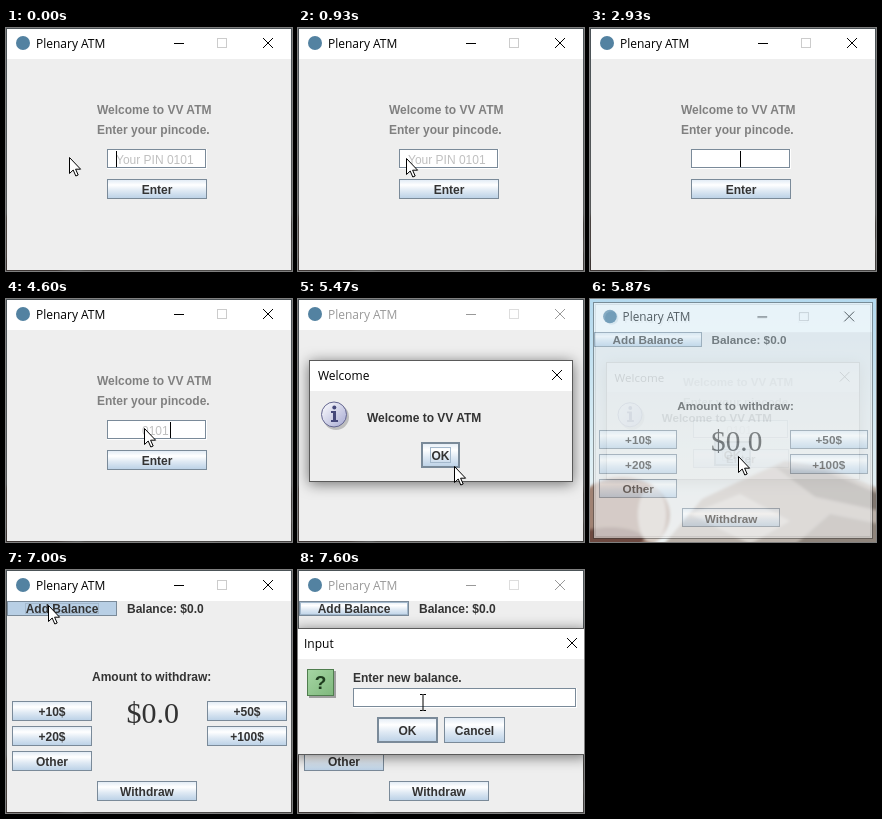
An HTML page that plays this animation: 286 by 243 pixels, repeating every 8 s.

```html
<!DOCTYPE html>
<html lang="en">
<head>
<meta charset="utf-8">
<title>Plenary ATM</title>
<style>
html, body { margin: 0; height: 100%; overflow: hidden; background: #eee; }
svg { display: block; width: 100%; height: 100%; }
text { font: bold 12px "Liberation Sans", Arial, sans-serif; fill: #333; white-space: pre; }
rect { shape-rendering: crispEdges; }
.title { font: 12px "Open Sans", "Noto Sans", sans-serif; fill: #000; }
.grey { fill: #808080; }
.entry { font-weight: normal; fill: #c0c0c0; }
.money { font: 30px "Liberation Serif", "Times New Roman", serif; }
.mid { text-anchor: middle; }
.sign { fill: none; stroke: #000; }
.off { stroke: #ccc; }
.idle .title { fill: #999; }
.idle .sign { stroke: #999; }
.idle .off { stroke: #ddd; }
.shade { filter: drop-shadow(0 2px 7px #0008); }
</style>
</head>
<body>
<svg id="stage" viewBox="0 0 286 243" preserveAspectRatio="none">
  <defs>
    <linearGradient id="face" x2="0" y2="1">
      <stop stop-color="#dde8f3"/><stop offset=".3" stop-color="#fff"/>
      <stop offset=".6" stop-color="#dde8f3"/><stop offset="1" stop-color="#b8cfe5"/>
    </linearGradient>
    <linearGradient id="sky" x2="0" y2="1">
      <stop stop-color="#b4d9ee"/><stop offset=".6" stop-color="#dbeef5"/><stop offset="1" stop-color="#eef3f3"/>
    </linearGradient>
    <linearGradient id="lilac" x2="1" y2="1">
      <stop stop-color="#fff"/><stop offset="1" stop-color="#a5a8d2"/>
    </linearGradient>
    <linearGradient id="green" x2="1" y2="1">
      <stop stop-color="#a6d6a4"/><stop offset="1" stop-color="#7fb87d"/>
    </linearGradient>
    <filter id="soft"><feGaussianBlur stdDeviation="1.5"/></filter>
  </defs>
  <g id="desktop">
    <rect width="286" height="243" fill="url(#sky)"/>
    <g filter="url(#soft)">
      <path d="M70 250L112 200 150 182 195 162 235 168 290 190V250z" fill="#b9b0a8"/>
      <path d="M185 168L235 172 290 195V212L225 198z" fill="#80776f"/>
      <path d="M100 215L150 195 200 222 160 245z" fill="#dad5cf"/>
      <path d="M200 250L240 215 290 225V250z" fill="#8f857c"/>
      <ellipse cx="32" cy="216" rx="48" ry="38" fill="#a08273"/>
      <ellipse cx="62" cy="216" rx="14" ry="28" fill="#d8cdc5"/>
      <ellipse cx="20" cy="240" rx="34" ry="12" fill="#6d4a40"/>
    </g>
  </g>
</svg>
<script>
const stage = document.getElementById('stage');
const APP = 'Plenary ATM', HELLO = 'Welcome to VV ATM';

const rect = (x, y, w, h, attrs) => `<rect x="${x}" y="${y}" width="${w}" height="${h}" ${attrs}/>`;
const box = (x, y, w, h, attrs) => rect(x + .5, y + .5, w - 1, h - 1, attrs);
const text = (x, y, s, cls = '') => `<text x="${x}" y="${y}" class="${cls}">${s}</text>`;
const cross = (x, y) => `<path class="sign" d="M${x} ${y}l10 10m0-10l-10 10"/>`;

function button(x, y, w, h, label, id = '', strong = false) {
  const edge = strong ? rect(x + 1, y + 1, w - 2, h - 2, 'fill="none" stroke="#7a8a99" stroke-width="2"')
                      : box(x, y, w, h, 'fill="none" stroke="#7a8a99"');
  return rect(x, y, w, h, `fill="url(#face)" ${id && `id="${id}"`}`) + edge +
    text(x + w / 2, y + h / 2 + (h < 18 ? 4.5 : 5), label, 'mid');
}

const frame = (x, y, w, h, id = '') => box(x, y, w, h, `fill="none" stroke="#a3b8cc" id="${id}"`);

const field = (x, y, w, h) => rect(x, y, w, h, 'fill="#fff"') +
  box(x, y, w - 1, h - 1, 'fill="none" stroke="#7a8a99"');

const appWindow = (id, body) => `<g id="${id}">` +
  rect(0, 0, 286, 243, 'fill="#323232" fill-opacity=".8"') +
  rect(1, 1, 284, 30, 'fill="#fff"') + rect(1, 31, 284, 211, 'fill="#eee"') +
  '<circle cx="17" cy="15" r="7" fill="#5382a1"/>' + text(30, 20, APP, 'title') +
  '<path class="sign" d="M168 15.5h10"/>' +
  box(211, 10, 10, 10, 'class="sign off"') + cross(257, 10) + body + '</g>';

const dialog = (id, x, y, w, h, title, body) => `<g id="${id}">` +
  rect(x, y, w, h, 'fill="#5a5a5a" class="shade"') +
  rect(x + 1, y + 1, w - 2, 30, 'fill="#fff"') +
  rect(x + 1, y + 31, w - 2, h - 32, 'fill="#eee"') +
  text(x + 9, y + 20, title, 'title') + cross(x + w - 21, y + 10) + body + '</g>';

const infoIcon = '<circle cx="38" cy="118" r="13" fill="#0003"/>' +
  '<circle cx="36" cy="115.5" r="12.5" fill="url(#lilac)" stroke="#63658f"/>' +
  '<path d="M33 112h5v9h2v2h-7v-2h2v-7h-2z" fill="#45487a"/><circle cx="36.3" cy="108.5" r="2" fill="#45487a"/>';

const askIcon = rect(11, 101, 27, 27, 'fill="#0005"') +
  box(9, 99, 27, 27, 'fill="url(#green)" stroke="#4f7d4e"') +
  '<text x="22.5" y="119" class="mid" style="font-size:19px;fill:#1e3c1e">?</text>';

const login = appWindow('login',
  text(91, 86, HELLO, 'grey') + text(91, 106, 'Enter your pincode.', 'grey') +
  field(101, 121, 100, 20) + rect(110, 123, 79, 16, 'id="mark" fill="#b8cfe5"') +
  '<text id="pin" y="136" class="entry"></text>' +
  rect(110, 123, 1, 16, 'id="caret" fill="#000"') +
  button(101, 151, 100, 20, 'Enter', 'enter'));

const bank = appWindow('bank',
  button(1, 31, 110, 15, 'Add Balance', 'add') + frame(19, 33, 74, 11, 'focus') + frame(2, 32, 108, 13, 'hover') +
  text(121, 43, 'Balance: $0.0') + text(86, 111, 'Amount to withdraw:') +
  text(120.5, 153, '$0.0', 'money') +
  button(6, 131, 80, 20, '+10$') + button(6, 156, 80, 20, '+20$') + button(6, 181, 80, 20, 'Other') +
  button(201, 131, 80, 20, '+50$') + button(201, 156, 80, 20, '+100$') +
  button(91, 211, 100, 20, 'Withdraw'));

const welcome = dialog('welcome', 11, 61, 264, 122, 'Welcome',
  infoIcon + text(69, 123, HELLO) +
  button(123, 143, 39, 26, 'OK', 'ok', true) + frame(132, 148, 21, 16));

const input = dialog('input', -3, 58, 293, 127, 'Input',
  askIcon + text(55, 112, 'Enter new balance.') + field(55, 118, 224, 20) +
  button(79, 147, 61, 26, 'OK', '', true) + button(146, 147, 61, 26, 'Cancel'));

const pointer = '<path id="arrow" d="M.5.5v16l3.7-3.5 2.6 6 2.4-1-2.6-5.8h5z" fill="#fff" stroke="#000"/>' +
  '<path id="beam" d="M-3-7.5h2.5l.5.5.5-.5H3M0-7V8M-3 8.500h2.500l.5-.5.5.5H3" fill="none" stroke="#000"/>';

stage.insertAdjacentHTML('beforeend', login + welcome + bank + input + pointer);
const el = id => document.getElementById(id);

// Pointer way points: tick, x, y
const way = [
  [1, 63, 129], [5, 128, 133], [7, 128, 133], [10, 106, 130], [13, 106, 130], [16, 112, 130],
  [19, 112, 130], [21, 75, 114], [22, 61, 112], [24, 140, 160], [26, 220, 172], [28, 251, 196],
  [30, 205, 172], [32, 151, 139], [35, 140, 132], [68, 138, 129], [69, 138, 129], [74, 156, 167],
  [82, 156, 167], [85, 148, 157], [96, 148, 157], [103, 42, 35], [107, 42, 35], [113, 125, 132]
];

// Key presses in the PIN field: tick, content, left edge, caret place
const keys = [
  [0, 'Your PIN 0101', 110, 110], [44, '', 150, 150], [55, '0', 146.5, 153],
  [58, '01', 143, 157], [60, '010', 139.5, 160], [63, '0101', 136, 164]
];

const clamp = v => Math.min(1, Math.max(0, v));
const within = (k, a, b) => k >= a && k < b;
const show = (id, on) => { el(id).style.display = on ? '' : 'none'; };
const press = (id, on) => el(id).setAttribute('fill', on ? '#b8cfe5' : 'url(#face)');

function place(id, alpha, scale, cx, cy) {
  show(id, alpha > 0);
  el(id).setAttribute('opacity', alpha);
  el(id).setAttribute('transform', `translate(${cx} ${cy}) scale(${scale}) translate(${-cx} ${-cy})`);
}

// Windows grow while fading in and shrink while fading out
function fade(id, k, from, to, cx, cy) {
  const grow = 1 - (1 - clamp((k - from + 1) / 8)) ** 3;
  const leave = clamp((k - to + 1) / 4);
  place(id, grow * (1 - leave), (.945 + .055 * grow) * (1 - .05 * leave), cx, cy);
}

function pointAt(k) {
  const i = way.findIndex(p => p[0] > k);
  if (i === 0) return way[0].slice(1);
  if (i < 0) return way[way.length - 1].slice(1);
  const [a, b] = [way[i - 1], way[i]], t = (k - a[0]) / (b[0] - a[0]);
  return [1, 2].map(n => Math.round(a[n] + (b[n] - a[n]) * t));
}

function drawField(k) {
  const [since, pin, x, caret] = keys.filter(e => e[0] <= k).pop();
  const marked = within(k, 42, 44);
  el('pin').textContent = pin;
  el('pin').setAttribute('x', x);
  el('pin').style.fill = marked ? '#333' : '';
  show('mark', marked);
  el('caret').setAttribute('x', caret);
  show('caret', k < 76 && Math.floor((k - since) / 7.55) % 2 === 0);
}

function draw(k) {
  fade('login', k, -9, 86, 143, 121.5);
  fade('welcome', k, 76, 86, 143, 122);
  fade('bank', k, 87, 200, 143, 121.5);
  fade('input', k, 107, 200, 143, 121.5);
  el('login').classList.toggle('idle', k >= 76);
  el('bank').classList.toggle('idle', k >= 107);
  drawField(k);
  press('enter', within(k, 74, 76));
  press('ok', k >= 85);
  press('add', within(k, 104, 107));
  show('focus', within(k, 92, 107));
  show('hover', k >= 107);
  const [x, y] = pointAt(k);
  for (const id of ['arrow', 'beam']) el(id).setAttribute('transform', `translate(${x} ${y})`);
  show('arrow', k < 112 && !within(k, 38, 69));
  show('beam', k >= 112);
}

// 15 ticks a second, 120 ticks a loop
const start = performance.now();
let last = -1;
function loop() {
  const t = (performance.now() - start) % 8000;
  const k = Math.floor((t + 4) * .015) % 120;
  if (k !== last) draw(last = k);
  requestAnimationFrame(loop);
}
loop();
</script>
</body>
</html>
```
